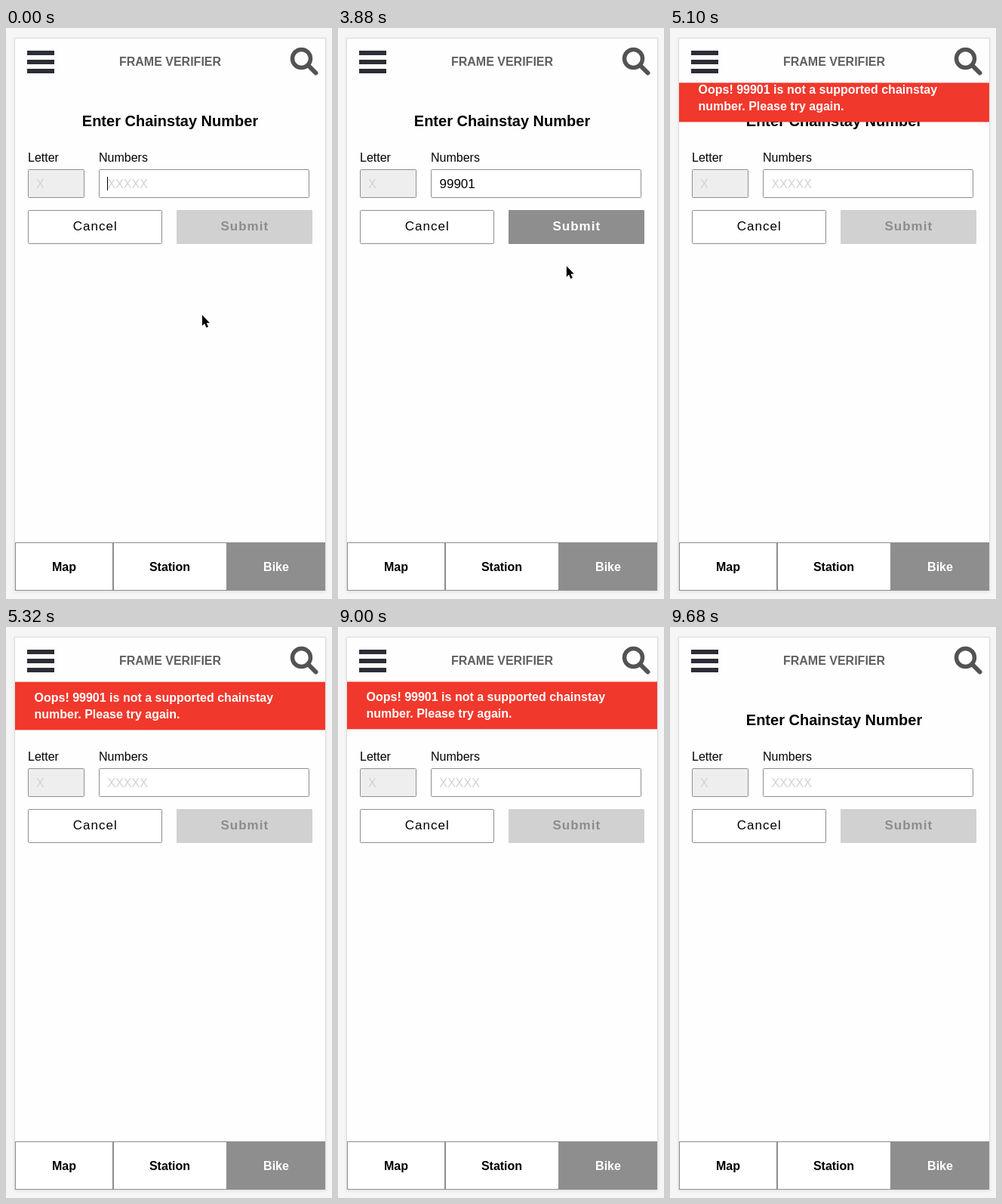
An HTML page that plays this animation: 432x756 px, repeating every 9.7 s.

```html
<!DOCTYPE html>
<html lang="en">
<head>
<meta charset="utf-8">
<title>Chainstay form</title>
<style>
  html, body { margin: 0; width: 100%; height: 100%; overflow: hidden; background: #f6f6f6; }
  svg { display: block; width: 432px; height: 756px; }
  text { font: 16px "Liberation Sans", Arial, sans-serif; fill: #000; white-space: pre; }
  .bold { font-weight: 700; }
  .mid { text-anchor: middle; }
  .button { font-size: 17px; letter-spacing: 1px; }
  .hint { fill: #d2d2d2; }
  .line { fill: #fff; stroke: #8e8e8e; }
  .white { fill: #fff; }
</style>
</head>
<body>
<svg viewBox="0 0 432 756">
  <defs>
    <clipPath id="below"><rect x="12" y="72.5" width="411" height="608"/></clipPath>
    <filter id="shade" x="-5%" y="-5%" width="110%" height="110%"><feGaussianBlur stdDeviation="2"/></filter>
  </defs>
  <rect width="432" height="756" fill="#f6f6f6"/>
  <rect x="11" y="14" width="413" height="733" fill="#e4e4e4" filter="url(#shade)"/>
  <rect x="11.5" y="13.5" width="412" height="731" fill="#fefefe" stroke="#dcdcdc"/>

  <path d="M28 33H64M28 45H64M28 57H64" stroke="#2d2d37" stroke-width="6"/>
  <text class="bold mid" x="217.5" y="50" style="fill:#606060">FRAME VERIFIER</text>
  <g fill="none" stroke="#535353">
    <circle cx="391.5" cy="40.5" r="12" stroke-width="5.5"/>
    <path d="M400.5 49.5L410.5 59.5" stroke-width="6" stroke-linecap="round"/>
  </g>

  <text class="bold mid" x="217.5" y="130" style="font-size:20px">Enter Chainstay Number</text>
  <text x="29" y="177">Letter</text>
  <text x="123" y="177">Numbers</text>
  <rect class="line" x="29.5" y="187.5" width="74" height="37" rx="1" style="fill:#eee"/>
  <text class="hint" x="40" y="212">X</text>
  <rect class="line" x="123.5" y="187.5" width="278" height="37" rx="1"/>
  <text class="hint" id="hint" x="134.5" y="212">XXXXX</text>
  <text id="digits" x="134.5" y="212" style="font-size:17px"></text>
  <rect id="caret" y="197" width="1" height="18"/>

  <rect class="line" x="29.5" y="241.5" width="177" height="44" rx="1"/>
  <text class="button mid" x="118.3" y="268">Cancel</text>
  <rect id="submit" x="226" y="241" width="180" height="45" rx="1"/>
  <text class="button bold mid" id="submitText" x="316.3" y="268">Submit</text>

  <g clip-path="url(#below)">
    <g id="banner">
      <rect x="12" y="73" width="411" height="64" fill="#f1382c"/>
      <text class="bold white" x="37.5" y="100">Oops! 99901 is not a supported chainstay</text>
      <text class="bold white" x="37.5" y="122">number. Please try again.</text>
    </g>
  </g>

  <rect class="line" x="12.5" y="681.5" width="129" height="63"/>
  <rect class="line" x="142.5" y="681.5" width="150" height="63"/>
  <rect x="293" y="681" width="130" height="64" fill="#8e8e8e"/>
  <text class="bold mid" x="77" y="719">Map</text>
  <text class="bold mid" x="217" y="719">Station</text>
  <text class="bold mid white" x="358" y="719">Bike</text>

  <path id="pointer" d="M0 0V14.2L3.2 11.3L5.5 16.7L8 15.6L5.7 10.4H10Z" stroke="#fff" stroke-width="1.2" paint-order="stroke"/>
</svg>
<script>
const LOOP = 9700;
const CLICK = 4600;
const KEYS = [2180, 2380, 2580, 2820, 3000];
const NUMBER = '99901';
const CARET_OFF = [[460, 1080], [1680, 2180], [3540, 4140], [CLICK, LOOP]];
const POINTER_PATH = [
  [0, 260, 380], [3540, 260, 380], [4180, 338, 262], [CLICK, 338, 262], [4800, 440, 262]
];
const POINTER_HIDDEN = [[2200, 3540], [4800, LOOP]];
const BANNER = { down: 4800, up: 8975, time: 600, height: 64 };

const $ = id => document.getElementById(id);
const inside = (spans, t) => spans.some(([a, b]) => t >= a && t < b);
const clamp = v => Math.min(1, Math.max(0, v));
const smooth = p => p * p * (3 - 2 * p);
const show = (id, on) => $(id).setAttribute('visibility', on ? 'visible' : 'hidden');
const move = (id, x, y) => $(id).setAttribute('transform', `translate(${x} ${y})`);

// CSS "ease": cubic-bezier(.25, .1, .25, 1)
function ease(p) {
  if (p <= 0 || p >= 1) return clamp(p);
  const curve = (u, a, b) => 3 * (1 - u) ** 2 * u * a + 3 * (1 - u) * u * u * b + u ** 3;
  let low = 0, high = 1;
  for (let i = 0; i < 24; i++) {
    const u = (low + high) / 2;
    if (curve(u, .25, .25) < p) low = u; else high = u;
  }
  return curve(low, .1, 1);
}

function pointerAt(t) {
  const next = POINTER_PATH.findIndex(step => step[0] > t);
  if (next < 0) return POINTER_PATH.at(-1).slice(1);
  const [t0, x0, y0] = POINTER_PATH[next - 1], [t1, x1, y1] = POINTER_PATH[next];
  const p = smooth((t - t0) / (t1 - t0));
  return [x0 + (x1 - x0) * p, y0 + (y1 - y0) * p];
}

function draw(t) {
  const count = t < CLICK ? KEYS.filter(k => t >= k).length : 0;
  const ready = count === NUMBER.length;
  $('digits').textContent = NUMBER.slice(0, count);
  show('hint', !count);
  $('caret').setAttribute('x', count ? Math.round(134.8 + count * 9.45) + 1 : 134);
  show('caret', !inside(CARET_OFF, t));
  $('submit').style.fill = ready ? '#8e8e8e' : '#d1d1d1';
  $('submitText').style.fill = ready ? '#fff' : '#8c8c8c';

  const slide = ease((t - BANNER.down) / BANNER.time) - ease((t - BANNER.up) / BANNER.time);
  move('banner', 0, (slide - 1) * BANNER.height);
  show('banner', slide > 0);

  move('pointer', ...pointerAt(t));
  show('pointer', !inside(POINTER_HIDDEN, t));
}

const start = performance.now();
function tick() {
  draw((performance.now() - start) % LOOP);
  requestAnimationFrame(tick);
}
tick();
</script>
</body>
</html>
```
